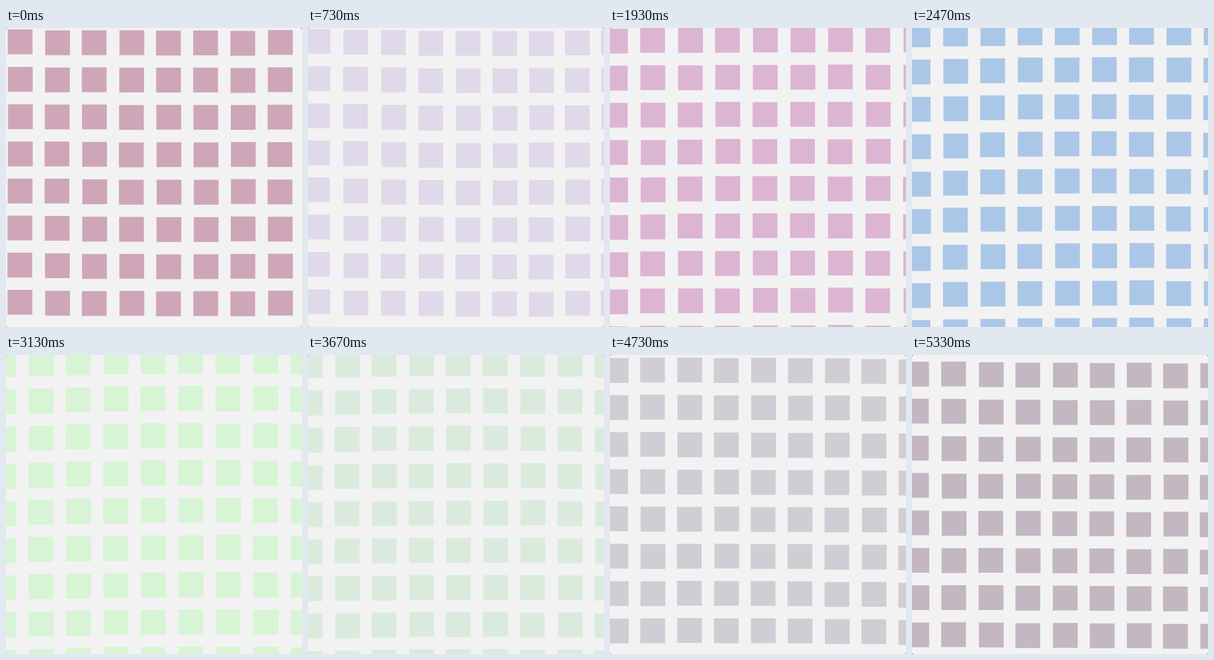
An HTML page for the animation above (5400 ms loop, 478 px wide and 482 px high).

```html
<!DOCTYPE html>
<html lang="en">
<head>
<meta charset="utf-8">
<title>Drifting squares</title>
<style>
  html, body { margin: 0; width: 100%; height: 100%; overflow: hidden; background: #333; }
  svg { display: block; width: 100vw; height: 100vh; }
</style>
</head>
<body>
<svg viewBox="0 0 478 482" preserveAspectRatio="none">
  <clipPath id="card"><rect width="478" height="482" rx="2.5"/></clipPath>
  <g clip-path="url(#card)">
    <rect width="478" height="482" fill="#f2f2f2"/>
    <g id="grid"></g>
  </g>
</svg>
<script>
const LOOP = 5400, TICK = 1000 / 15, LAST = 80;
const COUNT = 9, PITCH = 60, SIZE = 40;

// Ticks that repeat the picture before them.
const RESTS = [12, 13, 27, 28, 48, 49, 57, 58, 64, 75, 76];

// Key poses: colour, and the grid's shift at its left, middle and right.
const POSES = [
  { at: 0,  rgb: [206, 166, 184], x: [2.8, 2.8, 2.8],       y: [2.6, 4.4, 3.2] },
  { at: 11, rgb: [224, 217, 233], x: [-4.4, -1.5, -6.8],    y: [1.2, 5.2, 3.2] },
  { at: 29, rgb: [220, 181, 211], x: [-11, -9.5, -6.3],     y: [1.1, -0.9, -0.3] },
  { at: 37, rgb: [171, 199, 231], x: [-9.8, -9.4, -9.2],    y: [-8.6, -12.8, -11.5] },
  { at: 47, rgb: [215, 244, 213], x: [-23.8, -22.2, -20.2], y: [-4.5, -9.4, -8.7] },
  { at: 63, rgb: [221, 225, 228], x: [-8.6, -12, -13.2],    y: [-1, -1.6, 1.2] },
  { at: 80, rgb: [195, 183, 193], x: [-12.5, -12.8, -14.8], y: [10.7, 12.2, 13.4] }
];

const mixAll = (a, b, k) => a.map((v, i) => v + (b[i] - v) * k);

// Parabola through the left, middle and right values, u from -1 to 1.
const bend = ([l, m, r], u) => m + (r - l) / 2 * u + ((l + r) / 2 - m) * u * u;

let seed = 7;
const random = () => (seed = seed * 16807 % 2147483647) / 2147483647;

// Each column wavers down its length with its own phase.
const waver = (phase, row, tick) => 0.5 * Math.sin(phase + row * 0.8 + tick * 0.12);

const grid = document.getElementById("grid");
const cells = [];
for (let col = 0; col < COUNT; col++) {
  const px = random() * 2 * Math.PI, py = random() * 2 * Math.PI;
  for (let row = 0; row < COUNT; row++) {
    const el = document.createElementNS("http://www.w3.org/2000/svg", "rect");
    el.setAttribute("width", SIZE);
    el.setAttribute("height", SIZE);
    grid.appendChild(el);
    cells.push({ el, col, row, px, py });
  }
}

function poseAt(tick) {
  const i = Math.max(1, POSES.findIndex(p => p.at >= tick));
  const a = POSES[i - 1], b = POSES[i];
  const k = (tick - a.at) / (b.at - a.at);
  return {
    rgb: mixAll(a.rgb, b.rgb, k).map(Math.round),
    x: mixAll(a.x, b.x, k),
    y: mixAll(a.y, b.y, k)
  };
}

function draw(ms) {
  let tick = Math.min(LAST, Math.floor(ms % LOOP / TICK + 0.06));
  while (RESTS.includes(tick)) tick--;

  const { rgb, x, y } = poseAt(tick);
  grid.setAttribute("fill", `rgb(${rgb})`);
  for (const { el, col, row, px, py } of cells) {
    const u = col / (COUNT - 1) * 2 - 1;
    el.setAttribute("x", col * PITCH + bend(x, u) + waver(px, row, tick));
    el.setAttribute("y", row * PITCH + bend(y, u) + waver(py, row, tick));
  }
}

const start = performance.now();
function loop() {
  draw(performance.now() - start);
  requestAnimationFrame(loop);
}
loop();
</script>
</body>
</html>
```
